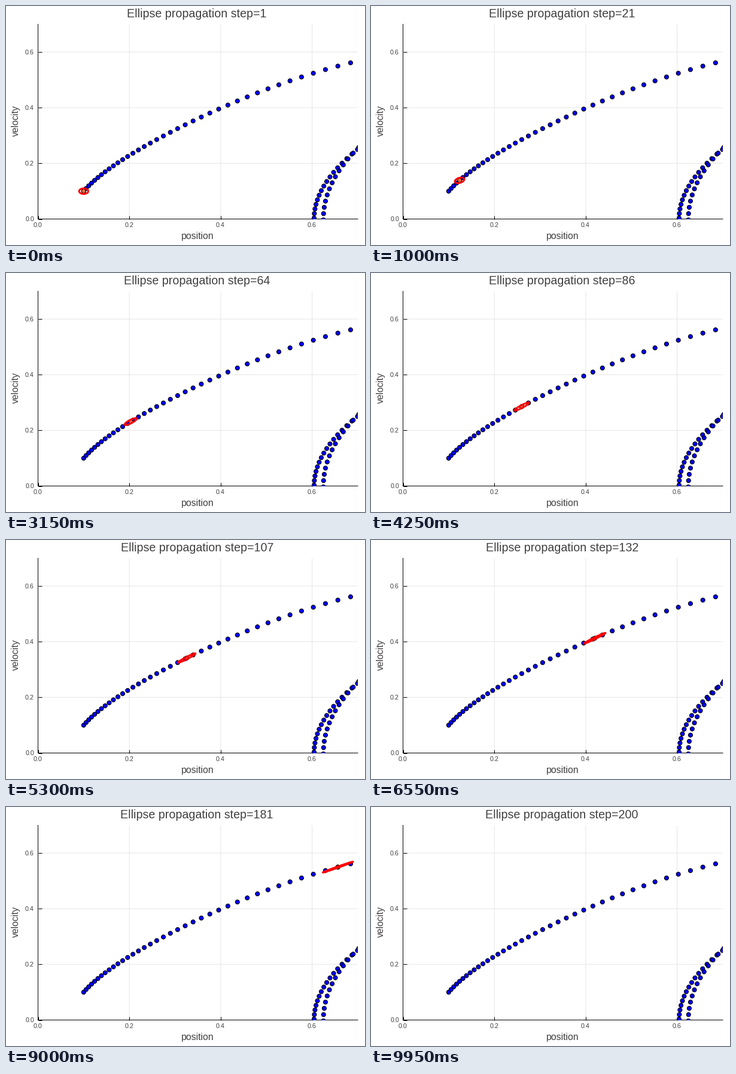
Write a matplotlib script that moves like this. It is 600 px wide and 400 px high and loops after 10000 ms.

```python
import numpy as np
import matplotlib.pyplot as plt
from matplotlib.animation import FuncAnimation
from matplotlib.patches import Ellipse
from numpy.polynomial import Polynomial

W, H, DPI = 600, 400, 100
LEFT, RIGHT, TOP, BOTTOM = 53.5, 588, 30.5, 356.5
LIMIT = 0.7
SX, SY = (RIGHT - LEFT) / LIMIT, (BOTTOM - TOP) / LIMIT
STEPS, DT, SAMPLE = 200, 0.01, 0.05
DAMPING, RADIUS = 0.12, 0.01
INK = "#404040"

plt.rcParams["path.snap"] = False


def px(n):
    """Pixels to points."""
    return n * 72 / DPI


# Outgoing path: smooth velocity through a few knots, position by integration.
knot_t = SAMPLE * np.array([0, 5, 10, 15, 20, 25, 30, 34, 37])
knot_v = [0.1, 0.1492, 0.2019, 0.2605, 0.3250, 0.3951, 0.4677, 0.5242, 0.5612]
velocity = Polynomial.fit(knot_t, knot_v, 5).convert()
position = velocity.integ(k=0.1)


def returning(x0, coef, count):
    """Samples of a later pass that turns back near x0."""
    v = Polynomial(coef)
    n = np.arange(count)
    return x0 + SAMPLE * v.integ()(n), v(n)


def ellipse_maps():
    """Linearised flow of the Duffing oscillator at every step."""
    flow, maps = np.eye(2), []
    for k in range(STEPS):
        maps.append(flow)
        x = position((k + 0.5) * DT)
        jac = np.array([[0, 1], [1 - 3 * x**2, -DAMPING]])
        flow = flow + DT * jac @ (flow + DT / 2 * jac @ flow)
    return maps


fig = plt.figure(figsize=(W / DPI, H / DPI), dpi=DPI, facecolor="white")
ax = fig.add_axes([LEFT / W, 1 - BOTTOM / H,
                   (RIGHT - LEFT) / W, (BOTTOM - TOP) / H])
ax.set_xlim(0, LIMIT)
ax.set_ylim(0, LIMIT)
ax.set_axisbelow(True)
ticks = [0, 0.2, 0.4, 0.6]
ax.set_xticks(ticks, [])
ax.set_yticks(ticks, [])
ax.tick_params(direction="in", length=px(6), width=px(1))
ax.grid(color="#e6e6e6", linewidth=px(1))
for side, spine in ax.spines.items():
    spine.set_visible(side in ("left", "bottom"))
    spine.set_linewidth(px(1))
    spine.set_zorder(1.5)


def label(x, y, text, size, **kw):
    kw = {"ha": "center", "va": "baseline", **kw}
    return fig.text(x / W, 1 - y / H, text, fontsize=px(size), color=INK,
                    family="Liberation Sans", **kw)


for t in ticks:
    label(LEFT - 0.5 + t * SX, 370, f"{t:.1f}", 10.7)
    label(47, BOTTOM + 3.7 - t * SY, f"{t:.1f}", 10.7, ha="right")
label(320.7, 390, "position", 15.9)
label(21, 192.3, "velocity", 15.6, rotation=90, rotation_mode="anchor")
title = label(319.2, 19, "", 19.6)


def dot(x, v, color, zorder):
    """Round marker that keeps its exact sub-pixel place."""
    return ax.add_patch(Ellipse((x, v), 7 / SX, 7 / SY, facecolor=color,
                                edgecolor="black", linewidth=px(1.1),
                                zorder=zorder))


times = SAMPLE * np.arange(40)
paths = [
    (position(times), velocity(times)),
    returning(0.6043, [0.0032, 0.01645], 18),
    returning(0.6246, [-0.0032, 0.02275, -0.000085], 15),
]
for xs, vs in paths:
    for x, v in zip(xs, vs):
        dot(x, v, "blue", 3)

center = dot(0, 0, "#e26f46", 4)
outline, = ax.plot([], [], color="red", linewidth=px(3), zorder=5,
                   solid_joinstyle="bevel", solid_capstyle="butt")

angle = np.linspace(0, 2 * np.pi, 49)
circle = RADIUS * np.array([np.cos(angle), np.sin(angle)])
maps = ellipse_maps()


def draw(k):
    x, v = position(k * DT), velocity(k * DT)
    ex, ev = maps[k] @ circle
    center.set_center((x, v))
    outline.set_data(x + ex, v + ev)
    title.set_text(f"Ellipse propagation step={k + 1}")
    return center, outline, title


anim = FuncAnimation(fig, draw, frames=STEPS, interval=50, repeat=True,
                     repeat_delay=0, blit=False)
plt.show()
```
